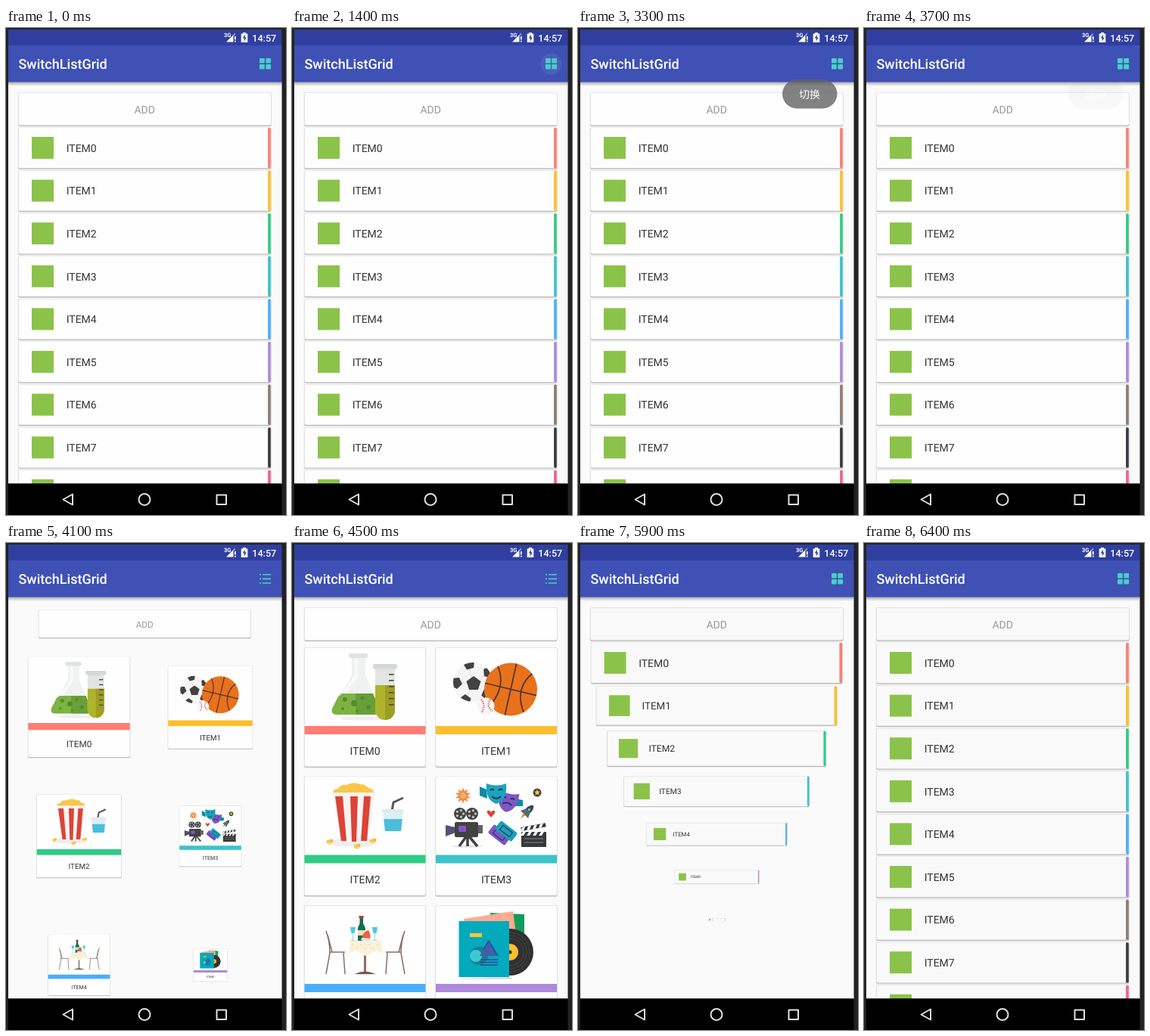
These frames come from a looping animation (370x644 px, 8000 ms). An HTML page:

```html
<!DOCTYPE html>
<html lang="en">
<head>
<meta charset="utf-8">
<title>SwitchListGrid</title>
<style>
html, body { margin: 0; width: 100%; height: 100%; overflow: hidden; background: #222; }
svg { display: block; width: 370px; height: 644px; }
text { font-family: Roboto, "Noto Sans CJK SC", "Noto Sans CJK", sans-serif; text-rendering: geometricPrecision; }
.mid { text-anchor: middle; }
</style>
</head>
<body>
<svg viewBox="0 0 370 644">
  <defs>
    <linearGradient id="drop" x2="0" y2="1">
      <stop stop-opacity=".34"/><stop offset="1" stop-opacity="0"/>
    </linearGradient>
    <clipPath id="soccer"><circle cx="239" cy="184" r="26"/></clipPath>
    <clipPath id="basket"><circle cx="289" cy="193.500" r="35"/></clipPath>
  </defs>
  <rect width="370" height="644" fill="#222"/>
  <rect x="3" y="71" width="361.500" height="532" fill="#fafafa"/>
  <g id="content"></g>

  <rect x="3" y="71" width="361.500" height="6" fill="url(#drop)"/>
  <rect x="3" y="2" width="361.500" height="21.500" fill="#303f9f"/>
  <rect x="3" y="23" width="361.500" height="48.500" fill="#3f51b5"/>
  <text x="16.500" y="54.100" font-size="18" font-weight="500" fill="#fff">SwitchListGrid</text>
  <g fill="#fff">
    <text x="288" y="12" font-size="7.500" font-weight="700">3G</text>
    <path d="M291 18.500L300.500 9V18.500Z"/>
    <path d="M300 9l3-3v4h-3z" opacity=".4"/>
    <path d="M302 11h1.700v4.500h-1.700zM302 16.700h1.700v1.800h-1.700z"/>
    <path d="M313 6h4v1.500h2.300V19h-8.600V7.500H313z"/>
    <path d="M315.800 8.500l-3 5h2v4l3-5h-2z" fill="#303f9f"/>
    <text x="325.300" y="17.500" font-size="12.600" font-weight="500">14:57</text>
  </g>
  <circle id="ripple" cx="342.500" cy="47.500" fill="#fff"/>
  <g id="gridIcon" fill="#48cfc6">
    <rect x="335" y="40" width="6.800" height="6.600" rx="1"/>
    <rect x="343.300" y="40" width="6.800" height="6.600" rx="1"/>
    <rect x="335" y="48" width="6.800" height="6.600" rx="1"/>
    <rect x="343.300" y="48" width="6.800" height="6.600" rx="1"/>
  </g>
  <path id="listIcon" fill="#48cfc6" d="M335 41h2v1.600h-2zM339 41h11v1.600h-11zM335 46.600h2v1.600h-2zM339 46.600h11v1.600h-11zM335 52.200h2v1.600h-2zM339 52.200h11v1.600h-11z"/>

  <rect x="3" y="602.300" width="361.500" height="42"/>
  <g fill="none" stroke="#e0e0e0" stroke-width="2" stroke-linejoin="round">
    <path d="M75.500 623.500L88 616.500V630.500Z"/>
    <circle cx="183" cy="623.500" r="7.500"/>
    <rect x="278.500" y="617.500" width="12.500" height="12.500"/>
  </g>
  <g id="toast">
    <rect x="270" y="68" width="72.500" height="38.500" rx="19.250" fill="#646464"/>
    <text class="mid" x="306" y="92.700" font-size="14" fill="#fff">切换</text>
  </g>
</svg>
<script>
const $ = id => document.getElementById(id);
const COLORS = ['#ff7d73', '#fdbf2d', '#2ecc85', '#3bc3ca', '#4baefa', '#af89dc', '#8f7c70', '#3a3a42', '#f0628f'];
const LOOP = 8000, STEP = 100, GROW = 400, STAGGER = 60;
const TO_GRID = 3900, TO_LIST = 5500;

const path = (d, fill) => `<path d="${d}" fill="${fill}"/>`;
const line = (d, color, width) => `<path d="${d}" fill="none" stroke="${color}" stroke-width="${width}"/>`;
const disc = (x, y, r, fill) => `<circle cx="${x}" cy="${y}" r="${r}" fill="${fill}"/>`;
const oval = (x, y, rx, ry, fill) => `<ellipse cx="${x}" cy="${y}" rx="${rx}" ry="${ry}" fill="${fill}"/>`;
const box = (x, y, w, h, fill, rx = 0) => `<rect x="${x}" y="${y}" width="${w}" height="${h}" rx="${rx}" fill="${fill}"/>`;
const group = (attrs, inner) => `<g ${attrs}>${inner}</g>`;

// Regular polygon, or a star when the inner radius differs.
function star(x, y, n, outer, inner, fill, turn = 0) {
  const points = Array.from({ length: 2 * n }, (_, i) => {
    const r = i % 2 ? inner : outer, a = turn + i * Math.PI / n - Math.PI / 2;
    return (x + r * Math.cos(a)).toFixed(1) + ',' + (y + r * Math.sin(a)).toFixed(1);
  });
  return `<polygon points="${points.join(' ')}" fill="${fill}"/>`;
}

function chemistry() {
  const ticks = [0, 1, 2, 3, 4, 5].map(i => box(128, 173 + i * 8, 6.500, 1.600, '#4a4a36')).join('');
  return oval(97, 232, 34, 2.500, '#eeeeee') +
    path('M79 151H97V175L115 219Q117 227 109 227H59Q51 227 53 219L79 175Z', '#f0f2f2') +
    path('M66 199H107L115 219Q117 227 109 227H59Q51 227 53 219L61 203Z', '#7cb342') +
    path('M84 199H107L115 219Q117 227 109 227H84Z', '#689f38') +
    [[70, 207, 3], [82, 212, 4], [93, 205, 2.500], [101, 217, 3], [67, 219, 2], [86, 222, 2]]
      .map(([x, y, r]) => disc(x, y, r, '#558b2f')).join('') +
    path('M83 153H87V176L72 199H66L83 174Z', '#fafafa') +
    box(75, 146, 25, 6, '#e0e2e2', 2) +
    path('M110 165H136V221A13 13 0 0 1 110 221Z', '#e3e5e4') +
    path('M110 188H136V221A13 13 0 0 1 110 221Z', '#afb42b') +
    path('M123 188H136V221A13 13 0 0 1 123 234Z', '#9e9d24') + ticks +
    box(107, 160, 32, 6.500, '#d5d7d7', 2);
}

function sports() {
  const patches = [[240, 186, 10], [217, 185, 8], [234, 160, 8], [260, 171, 8], [258, 200, 8], [229, 208, 8]]
    .map(([x, y, r], i) => star(x, y, 5, r, r * .81, '#424242', i * .5)).join('');
  const seams = 'M239 186L233 160M239 186L217 185M239 186L260 171M239 186L258 200M239 186L229 208';
  return disc(239, 184, 26, '#f5f5f5') +
    group('clip-path="url(#soccer)"', line(seams, '#ddd', 1) + patches) +
    disc(289, 193.500, 35, '#e8711c') +
    group('clip-path="url(#basket)"',
      line('M254 185L325 202M297 158L281 229M270 158Q286 190 258 219M321 170Q292 191 307 226', '#4e342e', 1.700)) +
    disc(256, 216, 11.500, '#f7f7f7') +
    line('M250 207Q257 215 250 225M262 207Q256 216 265 222', '#e15241', 2.200).replace('/>', ' stroke-dasharray="1.300 1.500"/>');
}

function popcorn() {
  const kernel = (x, y) => disc(x - 2, y, 2.500, '#fbc64b') + disc(x + 2, y - 1, 2.500, '#f6b93b') + disc(x, y + 2, 2, '#fbd36b');
  return path('M46 396L64 390H101L106 401H59Z', '#eeeeee') +
    path('M54 330Q55 325 61 325Q64 319 72 320Q81 315 90 319Q97 319 101 324Q108 325 108 330Z', '#fbc64b') +
    path('M54 330H109L101 395H64Z', '#f6f4f2') +
    path('M57 335H67L72 394H65ZM77 335H87L85 395H79ZM95 335H104L99 394H91Z', '#db4437') +
    kernel(50, 395) + kernel(86, 401) + kernel(107, 394) +
    line('M132 354L134 343L147 337', '#55595c', 3) +
    path('M120 354H147L144 381H123Z', '#dceff4') + path('M121.200 365H145.800L144 381H123Z', '#4cbddb') +
    box(118.500, 352, 29, 3.500, '#e3e7e8', 1);
}

function cinema() {
  const reel = x => disc(x, 358, 8, '#424242') +
    [0, 1, 2, 3, 4].map(i => disc(x + 4.500 * Math.cos(i * 1.257), 358 + 4.500 * Math.sin(i * 1.257), 1.700, '#bdbdbd')).join('');
  const face = (x, y, fill, mouth) => path(`M${x - 13} ${y - 13}Q${x} ${y - 8} ${x + 13} ${y - 13}Q${x + 15} ${y + 9} ${x} ${y + 14}Q${x - 15} ${y + 9} ${x - 13} ${y - 13}Z`, fill) +
    line(`M${x - 8} ${y - 4}q3 -3 5 0M${x + 3} ${y - 4}q3 -3 5 0M${x - 6} ${y + 4}q6 ${mouth} 12 0`, '#22305a', 1.800);
  const ticket = (x, y, turn, fill) => group(`transform="translate(${x} ${y}) rotate(${turn})"`,
    box(-14, -7, 28, 14, fill, 2) + line('M-8 -3.500H8V3.500H-8Z', '#37306e', 1.200));
  const stripes = y => [0, 1, 2, 3].map(i => path(`M${305 + i * 8} ${y}h4l-3 5h-4z`, '#f5f5f5')).join('');
  return star(226, 334, 10, 10.500, 6, '#ef8a4b') + star(226, 334, 8, 5, 3.500, '#f7b267') +
    path('M257 326L248 322V334L258 338Z', '#0e8ba3') + path('M296 338L305 340V348L295 348Z', '#0e8ba3') +
    group('transform="rotate(12 285 342)"', face(285, 342, '#7e57c2', -5)) + face(270, 331, '#1aa5bd', 6) +
    disc(324, 330, 5.500, '#424242') + star(324, 330, 5, 4.500, 2, '#fbc02d') +
    path('M263 363L258 357Q257 353 261 354L263 356L265 354Q269 353 268 357Z', '#e53935') +
    group('transform="rotate(45 312 354)"', path('M308 360V351Q309 346 312 344Q315 346 316 351V360Z', '#424242') +
      path('M308 354L305 361H319L316 354Z', '#546e7a') + path('M310 361H314L312 368Z', '#fb8c00') + disc(312, 352, 1.700, '#4dd0e1')) +
    oval(232, 401, 20, 1.800, '#e5e5e5') + line('M231 387L221 401M233 387L245 401M232 387V401', '#424242', 3.500) +
    reel(222) + reel(238) + path('M203 373L216 376V383L203 388Z', '#555078') +
    box(215, 369, 31, 20, '#424242', 2) + box(220, 374, 10, 8, '#7e57c2', 1) + box(246, 373, 6, 11, '#616161') +
    ticket(274, 386, 38, '#7e57c2') + ticket(283, 381, 38, '#17a3ba') +
    box(303, 382, 33, 20, '#37383a', 1) + line('M307 391H332M307 396H332', '#8a8a8a', 1) + stripes(382) +
    group('transform="rotate(-10 303 380)"', box(303, 376, 33, 5, '#37383a') + stripes(376));
}

function dinner() {
  const chair = line('M45 513Q50 527 50 542M49 541H70M50 542L45 570M68 542L70 570M47 518L53 541', '#8d6e63', 1.500);
  const glass = x => path(`M${x - 3.500} 508h7l-1 7q-2.500 3 -5 0z`, '#4dc9e6') + line(`M${x} 516v9M${x - 3} 525.500h6`, '#9ed9e6', 1.200);
  return oval(97, 570, 16, 1.500, '#e6e6e6') + chair + group('transform="translate(194 0) scale(-1 1)"', chair) +
    line('M96.500 543V568', '#8d6e63', 3) + path('M83 570Q96.500 563 110 570Z', '#795548') +
    path('M77 526H117L120 543L111 539L97 546L84 539L75 543Z', '#fbf1d8') +
    [0, 1, 2, 3, 4, 5, 6].map(i => disc(80 + i * 5.500, 531 + i % 2 * 5, 1, '#efd9a5')).join('') +
    path('M89.500 493H94V503L97 509V526H87V509L89.500 503Z', '#146b4e') + box(87, 512, 10, 7, '#e9dfc4') +
    glass(80.500) + glass(109.500) + oval(98, 524, 7, 2.500, '#e8e8e8') +
    path('M92 522Q95 513 101 512Q105 519 103 523Z', '#e2673c') + box(88.500, 493, 6, 3, '#c0392b');
}

function records() {
  const grooves = [18, 22, 26].map(r => `<circle cx="288" cy="541" r="${r}" fill="none" stroke="#4b4b4b" stroke-width=".8"/>`).join('');
  return path('M262 489L307 491V534H262Z', '#149c5b') + path('M227 497L292 487L299 540L236 548Z', '#ffab91') +
    disc(288, 541, 31, '#303030') + grooves + disc(288, 541, 11, '#fbc02d') + disc(288, 541, 2.500, '#303030') +
    path('M221 577H292L286 572Z', '#e0e0e0') + box(220.500, 500, 66.500, 74, '#03a9bd') +
    box(235, 516, 16, 5, '#fdc92f') + disc(247, 546, 12, '#16808f') + disc(243, 546, 8, '#3dc7d4') +
    path('M260 525L273 546H248Z', '#3f60a8') + line('M253 537L260 526L272 546M249 551H272M249 554.500H272M249 558H272', '#35459a', 1.400);
}

const ART = [chemistry, sports, popcorn, cinema, dinner, records];

function addCard(x, y, w, h, inner, mode, order) {
  const el = document.createElementNS('http://www.w3.org/2000/svg', 'g');
  el.innerHTML = group('fill-opacity=".1"', box(-.8, -.5, w + 1.600, h + 2.500, '#000', 2.500)) +
    group('fill-opacity=".17"', box(-.2, 0, w + .4, h + 1.200, '#000', 2)) +
    box(0, 0, w, h, '#fefefe', 2).replace('<rect', '<rect class="face"') + inner;
  $('content').append(el);
  return { el, x, y, w, h, mode, order, face: el.querySelector('.face') };
}

const label = (x, y, str, fill = '#333', cls = '') => `<text class="${cls}" x="${x}" y="${y}" font-size="14" fill="${fill}">${str}</text>`;

const cards = [addCard(16.500, 85.500, 333.500, 43, label(166.700, 27.400, 'ADD', '#999', 'mid'), 'both', 0)];
COLORS.forEach((color, i) => {
  const inner = box(17.500, 12, 29, 29, '#8bc34a') + label(63.200, 31.800, 'ITEM' + i) + box(329.600, 0, 3.700, 53.200, color, 1.500);
  cards.push(addCard(16.500, 132 + i * 56.600, 333.500, 53.200, inner, 'list', i + 1));
});
ART.forEach((art, i) => {
  const col = i % 2, row = i >> 1;
  const x = 16.500 + col * 173.500, y = 138.500 + row * 170.500;
  const inner = group(`transform="translate(${-x} ${-y})"`, art()) +
    box(0, 103.500, 160, 11, COLORS[i]) + label(80, 141, 'ITEM' + i, '#333', 'mid');
  cards.push(addCard(x, y, 160, 157, inner, 'grid', col + row));
});

const clamp = v => Math.max(0, Math.min(1, v));
const decelerate = v => 1 - (1 - clamp(v)) ** 2;
const show = (el, on) => el.setAttribute('display', on ? 'inline' : 'none');

function drawCards(t, mode) {
  const start = mode === 'grid' ? 3860 : 5466;
  for (const card of cards) {
    const { el, x, y, w, h, order } = card;
    const scale = t < TO_GRID ? 1 : decelerate((t - start - order * STAGGER) / GROW);
    show(el, scale > 0 && (card.mode === 'both' || card.mode === mode));
    el.setAttribute('transform', `translate(${x + w / 2} ${y + h / 2}) scale(${scale}) translate(${-w / 2} ${-h / 2})`);
    card.face.setAttribute('fill', t >= TO_LIST ? '#f9f9f9' : '#fefefe');
  }
}

function draw(t) {
  const mode = t >= TO_GRID && t < TO_LIST ? 'grid' : 'list';
  drawCards(t, mode);
  show($('gridIcon'), mode === 'list');
  show($('listIcon'), mode === 'grid');

  const press = clamp((t - 1100) / 500);
  const glow = t < 2200 ? .12 * press : t < 2300 ? .09 : .06;
  show($('ripple'), t >= 1200 && t < 3300);
  $('ripple').setAttribute('r', 8 + 10 * press);
  $('ripple').setAttribute('opacity', glow);

  const fade = t < 3200 ? clamp((t - 1400) / 400) : Math.max(.03, 1 - (t - 3200) / 515);
  show($('toast'), fade > 0 && t < TO_GRID);
  $('toast').setAttribute('opacity', fade);
}

const origin = performance.now();
function frame() {
  const t = (performance.now() - origin) % LOOP;
  draw(Math.floor(t / STEP) * STEP);
  requestAnimationFrame(frame);
}
frame();
</script>
</body>
</html>
```
